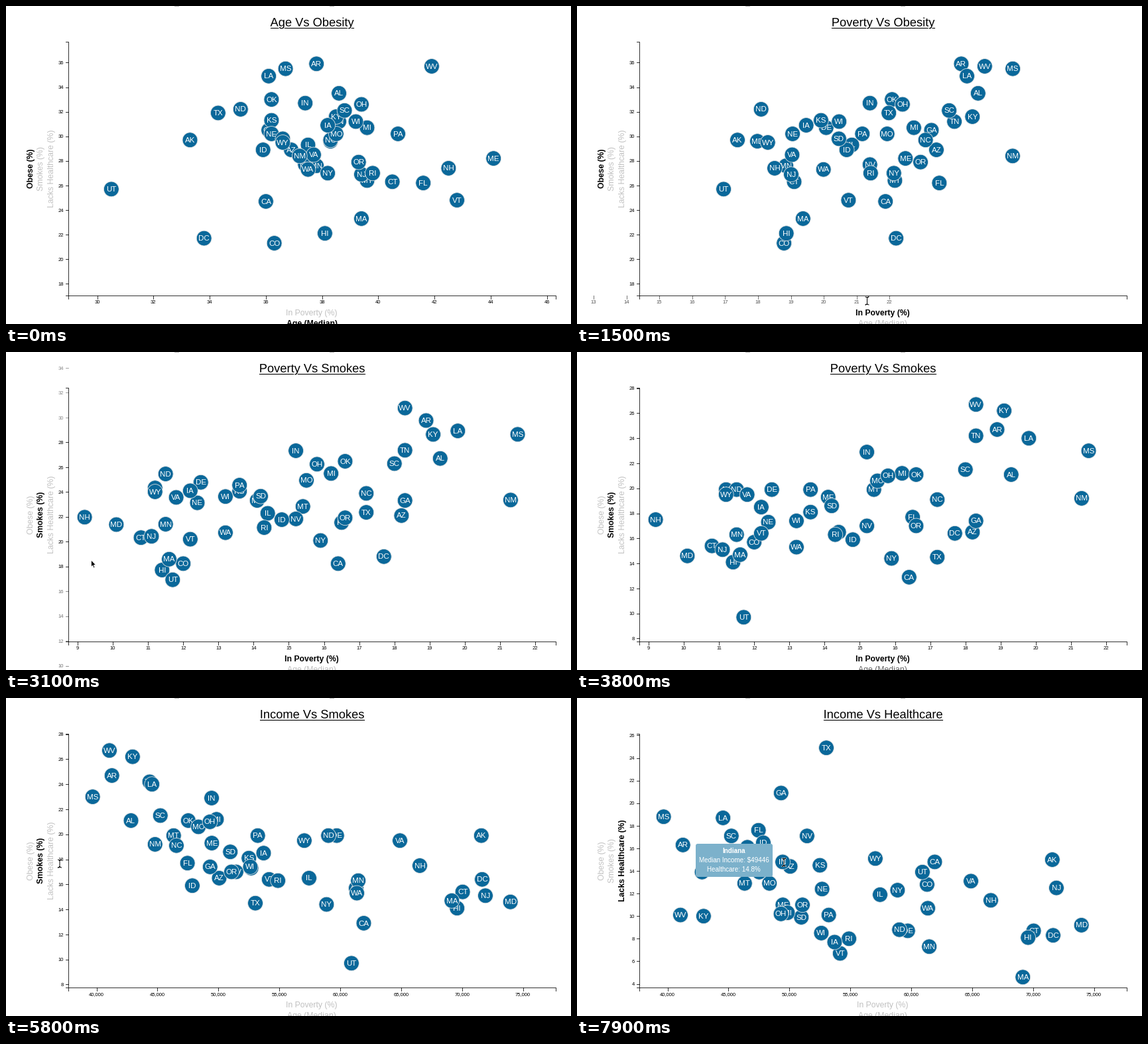
These frames come from a looping animation (852x480 px, 8 s). A matplotlib script:

```python
import numpy as np
import matplotlib.pyplot as plt
from matplotlib.animation import FuncAnimation
from matplotlib.lines import Line2D
from matplotlib.patches import Circle, FancyBboxPatch, Polygon
from matplotlib.patheffects import withStroke

W, H, DPI = 852, 480, 100
PX = 72 / DPI
STEP, LOOP, MOVE = 100, 8000, 1000
LEFT, RIGHT, TOP, BOTTOM = 94.2, 828.6, 54, 437
MID_X, MID_Y = 461.2, 245.5
BLUE, GREY = "#0a689a", 0.757

STATES = ("AL AK AZ AR CA CO CT DE DC FL GA HI ID IL IN IA KS KY LA ME MD MA MI "
          "MN MS MO MT NE NV NH NJ NM NY NC ND OH OK OR PA RI SC SD TN TX UT VT "
          "VA WA WV WI WY").split()

# bottom to top
STACK = ("AK FL CA AR DE MT CT CO AZ MD ME MN NV IL ID GA KS HI TN KY AL NH NE "
         "NY NJ ND LA VA NC SD MI OK MO WA WI VT MS IN DC UT SC OH OR PA RI MA "
         "TX WV WY NM IA").split()

DATA = {
    "Poverty": [19.3, 11.2, 18.2, 18.9, 16.4, 12, 10.8, 12.5, 17.7, 16.5, 18.3,
                11.4, 14.8, 14.4, 15.2, 12.2, 13.6, 19.1, 19.8, 14.1, 10.1,
                11.6, 16.2, 11.5, 21.5, 15.5, 15.4, 12.4, 15.2, 9.2, 11.1,
                21.3, 15.9, 17.2, 11.5, 15.8, 16.6, 16.6, 13.6, 14.3, 18, 14.2,
                18.3, 17.2, 11.7, 12.2, 11.8, 13.2, 18.3, 13.2, 11.2],
    "Age": [38.6, 33.3, 36.9, 37.8, 36, 36.3, 40.5, 39.6, 33.8, 41.6, 36.1,
            38.1, 35.9, 37.5, 37.4, 38.2, 36.2, 38.5, 36.1, 44.1, 38.3,
            39.4, 39.6, 37.8, 36.7, 38.5, 39.6, 36.2, 37.4, 42.5, 39.4,
            37.2, 38.2, 38.3, 35.1, 39.4, 36.2, 39.3, 40.7, 39.8, 38.8, 36.6,
            38.6, 34.3, 30.5, 42.8, 37.7, 37.5, 41.9, 39.2, 36.6],
    "Income": [42830, 71583, 50068, 41262, 61933, 61303, 70048, 59716, 71648,
               47463, 49321, 69592, 47861, 57444, 49446, 53712, 52504, 42958,
               44555, 49462, 73971, 69160, 49847, 61481, 39680, 48363, 46328,
               52686, 51450, 66532, 71919, 44803, 58878, 46556, 59029, 49308,
               47529, 51075, 53234, 54891, 45238, 50979, 44361, 53035, 60922,
               54166, 64902, 61366, 41059, 52622, 57055],
    "Obesity": [33.5, 29.7, 28.9, 35.9, 24.7, 21.3, 26.3, 30.7, 21.7, 26.2,
                30.5, 22.1, 28.9, 29.3, 32.7, 30.9, 31.3, 31.6, 34.9, 28.2,
                29.6, 23.3, 30.7, 27.6, 35.5, 30.2, 26.4, 30.2, 27.7, 27.4,
                26.9, 28.4, 27, 29.7, 32.2, 32.6, 33, 27.9, 30.2, 27, 32.1,
                29.8, 31.2, 31.9, 25.7, 24.8, 28.5, 27.3, 35.7, 31.2, 29.5],
    "Smokes": [21.1, 19.9, 16.5, 24.7, 12.9, 15.7, 15.4, 19.9, 16.4, 17.7,
               17.4, 14.1, 15.9, 16.5, 22.9, 18.5, 18.1, 26.2, 24, 19.3,
               14.6, 14.7, 21.2, 16.3, 23, 20.6, 19.9, 17.3, 17, 17.5,
               15.1, 19.2, 14.4, 19.1, 19.9, 21, 21.1, 17, 19.9, 16.3, 21.5,
               18.6, 24.2, 14.5, 9.7, 16.4, 19.5, 15.3, 26.7, 17.4, 19.5],
    "Healthcare": [13.9, 15, 14.4, 16.3, 14.8, 12.8, 8.7, 8.7, 8.3, 17.6,
                   20.9, 8.1, 16.5, 11.9, 14.8, 7.7, 14.5, 10, 18.7, 11,
                   9.2, 4.6, 10.3, 7.3, 18.8, 12.9, 12.9, 12.4, 17.1, 11.4,
                   12.5, 15.4, 12.3, 16.1, 8.8, 10.2, 13.9, 11, 10.1, 8, 17.1,
                   9.9, 14.2, 24.9, 13.9, 6.7, 13.1, 10.7, 10.1, 8.5, 15.1],
}
DATA = {k: np.array(v, float) for k, v in DATA.items()}
TICKS = {
    "Poverty": range(9, 23), "Age": range(30, 47, 2),
    "Income": range(40000, 75001, 5000), "Obesity": range(18, 37, 2),
    "Smokes": range(8, 29, 2), "Healthcare": range(4, 27, 2),
}
FIELDS = {"x": ("Poverty", "Age", "Income"),
          "y": ("Obesity", "Smokes", "Healthcare")}

# (time, field) chosen on each axis
PICKS = {"x": [(-5000, "Age"), (934, "Poverty"), (4609, "Income")],
         "y": [(-5000, "Obesity"), (2585, "Smokes"), (6050, "Healthcare")]}

# (time, x, y) of the pointer
POINTER = [(700, 452, 500), (900, 440, 464), (1300, 438, 462), (1500, 437.5, 445),
           (1700, 400, 405), (2200, 150, 275), (2500, 53, 258), (2750, 53, 258),
           (3200, 150, 330), (3600, 430, 440), (3800, 455, 492), (4620, 458, 500),
           (4800, 380, 430), (5000, 185, 275), (5100, 152.5, 247),
           (5500, 120, 250), (5900, 68, 250), (6150, 68, 250), (6400, 170, 270),
           (6600, 263.5, 275), (7000, 268, 274), (7500, 312, 248), (8000, 312, 248)]
BEAM_TIMES = [(700, 1600), (2400, 2850), (5800, 6250), (7450, 8000)]
TIP_TIME = 7600


def scale(field, v):
    d = DATA[field]
    if field in FIELDS["x"]:
        lo, hi = d.min() * 0.95, d.max() * 1.05
        return LEFT + (v - lo) / (hi - lo) * (RIGHT - LEFT)
    lo, hi = d.min() * 0.8, d.max() * 1.05
    return BOTTOM - (v - lo) / (hi - lo) * (BOTTOM - TOP)


def ease(u):
    u = min(max(u, 0), 1)
    return 4 * u ** 3 if u < 0.5 else 1 - 4 * (1 - u) ** 3


def choice(axis, t):
    """Previous field, current field, eased progress and time since the pick."""
    picks = PICKS[axis]
    k = max(i for i, p in enumerate(picks) if p[0] <= t)
    since = t - picks[k][0]
    return picks[max(k - 1, 0)][1], picks[k][1], ease(since / MOVE), since


plt.rcParams["font.family"] = "Liberation Sans"
fig = plt.figure(figsize=(W / DPI, H / DPI), dpi=DPI, facecolor="white")
ax = fig.add_axes([0, 0, 1, 1])
ax.set_xlim(0, W)
ax.set_ylim(H, 0)
ax.axis("off")


def line(xs, ys, width=0.8, color="black", **kw):
    item = Line2D(xs, ys, lw=width * PX, color=color, **kw)
    ax.add_line(item)
    return item


def label(x, y, s, size, **kw):
    kw = {"ha": "center", "va": "baseline", **kw}
    return ax.text(x, y, s, fontsize=size * PX, **kw)


# remains of the heading above the stage
for cx in (257, 491):
    line([cx - 3, cx + 3], [0, 0], 1, "#bbbbbb")

title = label(MID_X, 30.6, "", 18.3, zorder=3,
              path_effects=[withStroke(linewidth=1.6, foreground="white")])
underline = line([0, 0], [33, 33], 1.1, zorder=2)

line([LEFT, LEFT, RIGHT, RIGHT], [BOTTOM + 4.6, BOTTOM, BOTTOM, BOTTOM + 4.6])
line([LEFT - 4.6, LEFT, LEFT, LEFT - 4.6], [TOP, TOP, BOTTOM, BOTTOM])

ticks = {"x": {}, "y": {}}
for axis, fields in FIELDS.items():
    for v in {v for f in fields for v in TICKS[f]}:
        side = {"ha": "right"} if axis == "y" else {}
        ticks[axis][v] = (line([0, 0], [0, 0]),
                          label(0, 0, f"{v:,}", 7.65, **side))

upright = {"rotation": 90, "rotation_mode": "anchor"}
names = {
    "Poverty": label(MID_X, 467.4, "In Poverty (%)", 12.2),
    "Age": label(MID_X, 482.7, "Age (Median)", 12.2),
    "Income": label(MID_X, 498, "Household Income (Median)", 12.2),
    "Obesity": label(40.6, MID_Y, "Obese (%)", 12.25, **upright),
    "Smokes": label(56.4, MID_Y, "Smokes (%)", 12.25, **upright),
    "Healthcare": label(72.2, MID_Y, "Lacks Healthcare (%)", 12.25, **upright),
}

dots = []
for s in STATES:
    z = 10 + STACK.index(s)
    dot = Circle((0, 0), 11.4, fc=BLUE, ec="#e3e3e3", lw=0.8 * PX, zorder=z)
    ax.add_patch(dot)
    dots.append((dot, label(0, 0, s, 11.5, color="white", zorder=z + 0.5)))

tip = [FancyBboxPatch((182, 223), 110, 44, boxstyle="round,pad=3,rounding_size=3",
                      fc="#7cb1cb", ec="none", zorder=80)]
ax.add_patch(tip[0])
for y, s, weight in ((234.3, "Indiana", "bold"),
                     (248.3, "Median Income: $49446", "normal"),
                     (262, "Healthcare: 14.8%", "normal")):
    tip.append(label(236.7, y, s, 9.9, color="white", weight=weight, zorder=81))

ARROW = np.array([(0, 0), (0, 10.4), (2.3, 8.3), (4, 12.2), (5.6, 11.5),
                  (4, 7.7), (7.2, 7.6)])
arrow = Polygon(ARROW, fc="black", ec="white", lw=0.8 * PX, zorder=90)
ax.add_patch(arrow)
BEAM_X = np.array([-2.5, 0, 2.5, 0, 0, -2.5, 0, 2.5])
BEAM_Y = np.array([-6, -5, -6, -5, 5, 6, 5, 6])
beam = line(BEAM_X, BEAM_Y, 1, zorder=90,
            path_effects=[withStroke(linewidth=2 * PX, foreground="white")])


def draw_ticks(axis, t):
    old, new, e, _ = choice(axis, t)
    for v, (mark, text) in ticks[axis].items():
        was, now = v in TICKS[old], v in TICKS[new]
        a, b = scale(old, v), scale(new, v)
        p = a + (b - a) * e
        alpha = 1 if was and now else e if now else 1 - e if was else 0
        shown = alpha > 0.01 and -3 < p < W + 50
        for item in (mark, text):
            item.set_visible(shown)
            item.set_alpha(alpha)
        if not shown:
            continue
        if axis == "x":
            mark.set_data([p, p], [BOTTOM, BOTTOM + 4.6])
            text.set_position((p, 449))
        else:
            mark.set_data([LEFT - 4.6, LEFT], [p, p])
            text.set_position((LEFT - 6.9, p + 2.7))


def draw_names(t):
    for axis, fields in FIELDS.items():
        old, new, _, since = choice(axis, t)
        for f in fields:
            shade = GREY
            if f == old:
                shade *= min(since / 250, 1)
            if f == "Age" and 3700 <= t <= 3900:
                shade = 0.4
            names[f].set_color("black" if f == new else (shade,) * 3)
            names[f].set_weight("bold" if f == new else "normal")


def draw_dots(t):
    pos = []
    for axis in "xy":
        old, new, e, _ = choice(axis, t)
        a, b = scale(old, DATA[old]), scale(new, DATA[new])
        pos.append(a + (b - a) * e)
    for (dot, text), x, y in zip(dots, *pos):
        dot.center = (x, y)
        text.set_position((x, y + 3.6))


def draw_pointer(t):
    times, xs, ys = zip(*POINTER)
    x, y = np.interp(t, times, xs), np.interp(t, times, ys)
    on_text = any(a <= t < b for a, b in BEAM_TIMES)
    beam.set_visible(on_text)
    arrow.set_visible(not on_text)
    beam.set_data(BEAM_X + x, BEAM_Y + y)
    arrow.set_xy(ARROW + (x, y))


def update(i):
    t = i * STEP
    title.set_text(f"{choice('x', t)[1]} Vs {choice('y', t)[1]}")
    box = title.get_window_extent()
    underline.set_xdata([box.x0, box.x1])
    for axis in "xy":
        draw_ticks(axis, t)
    draw_names(t)
    draw_dots(t)
    draw_pointer(t)
    for item in tip:
        item.set_visible(t >= TIP_TIME)
    return []


anim = FuncAnimation(fig, update, frames=LOOP // STEP, interval=STEP,
                     init_func=lambda: [], repeat=True, repeat_delay=0)
plt.show()
```
